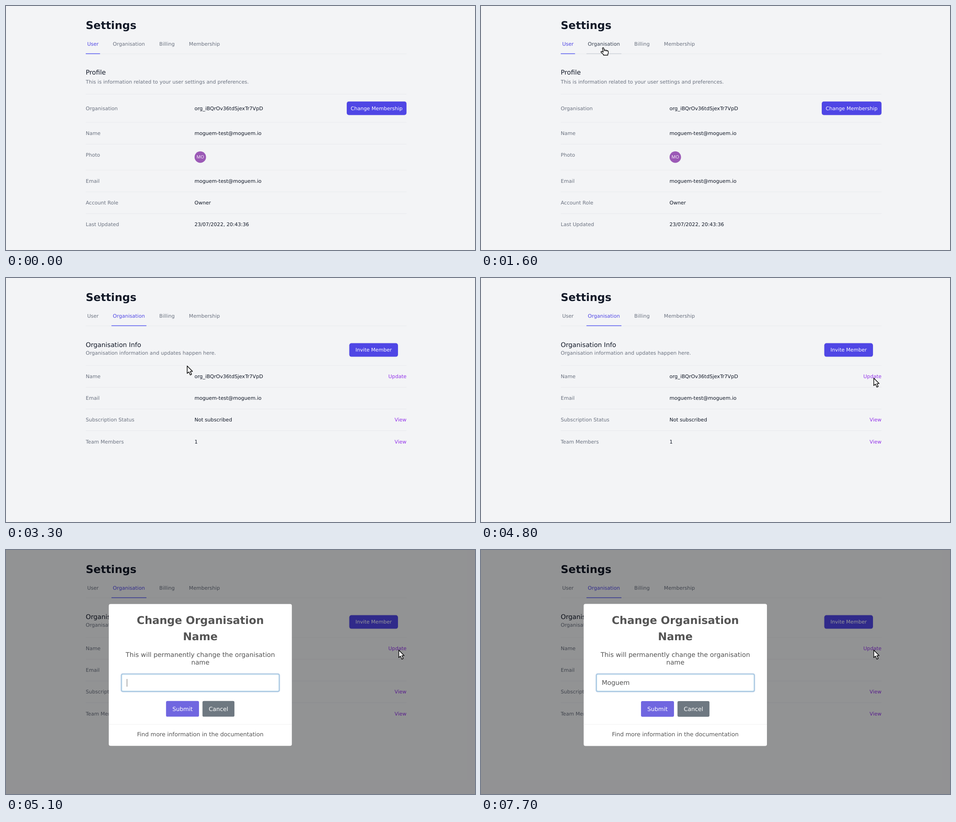
Recreate the animation shown at these times as an HTML page. Size 1035 by 541 pixels, loop 8000 ms.

```html
<!DOCTYPE html>
<html lang="en">
<head>
<meta charset="utf-8">
<title>Settings</title>
<style>
html, body { margin: 0; width: 100%; height: 100%; overflow: hidden; background: #f3f4f6; }
svg { display: block; width: 1035px; height: 541px; }
text { font-family: "DejaVu Sans", sans-serif; text-rendering: geometricPrecision; white-space: pre; }
.button { filter: drop-shadow(0 .8px .8px rgba(0, 0, 0, .08)); }
</style>
</head>
<body>
<svg id="stage" viewBox="0 0 1035 541"></svg>
<script>
const LOOP = 8000, STEP = 100;
const LEFT = 176, RIGHT = 883.8, VALUE = 416;
const SMALL = 11.06, BASE = 12.64, LARGE = 14.22, HUGE = 23.7;
const INK = '#111827', GREY = '#6b7280', LINE = '#e5e7eb', INDIGO = '#4f46e5', PURPLE = '#9333ea', MODAL = '#545454';
const ORG = 'org_iBQrOv36tdSjexTr7VpD', MAIL = 'moguem-test@moguem.io', TYPED = 'Moguem';
const stage = document.getElementById('stage');

function add(parent, tag, attrs, content) {
  const el = document.createElementNS('http://www.w3.org/2000/svg', tag);
  for (const key in attrs) el.setAttribute(key, attrs[key]);
  if (content) el.textContent = content;
  parent.appendChild(el);
  return el;
}
const group = (parent, attrs) => add(parent, 'g', attrs || {});
const rect = (parent, x, y, width, height, fill, rx = 0) =>
  add(parent, 'rect', { x, y, width, height, fill, rx });

// y is the middle of the line of text
function text(parent, content, x, y, size, fill, anchor = 'start', weight = 400) {
  return add(parent, 'text', {
    x, y: y + size * 0.346, fill, 'font-size': size, 'text-anchor': anchor, 'font-weight': weight
  }, content);
}
const show = (el, on) => el.setAttribute('visibility', on ? 'visible' : 'hidden');

function button(parent, label, x, y, width, height, fill, size, rx) {
  const g = group(parent);
  rect(g, x, y, width, height, fill, rx);
  text(g, label, x + width / 2, y + height / 2, size, '#fff', 'middle');
  return g;
}
function row(parent, y, label, value, middle = 24.5) {
  rect(parent, LEFT, y, RIGHT - LEFT, 0.8, LINE);
  text(parent, label, LEFT, y + middle, SMALL, GREY);
  if (value) text(parent, value, VALUE, y + middle, SMALL, INK);
}

// Header and tabs
text(stage, 'Settings', LEFT, 43.2, HUGE, INK, 'start', 700);
rect(stage, LEFT, 105.7, RIGHT - LEFT, 0.8, LINE);
const tabs = [['User', 176, 31.5], ['Organisation', 232.7, 77.2], ['Billing', 335.2, 40], ['Membership', 400.7, 74]]
  .map(([label, x, width]) => ({
    label: text(stage, label, x + 3.16, 84.6, SMALL, GREY),
    bar: rect(stage, x, 104.9, width, 1.6, INDIGO)
  }));

// User page
const userPage = group(stage);
text(userPage, 'Profile', LEFT, 147.5, LARGE, INK);
text(userPage, 'This is information related to your user settings and preferences.', LEFT, 168.3, SMALL, GREY);
row(userPage, 195.2, 'Organisation', ORG, 31.6);
row(userPage, 257.6, 'Name', MAIL);
row(userPage, 305.8, 'Photo');
row(userPage, 363.5, 'Email', MAIL);
row(userPage, 411.7, 'Account Role', 'Owner');
row(userPage, 459.9, 'Last Updated', '23/07/2022, 20:43:36');
button(userPage, 'Change Membership', 752, 211.7, 131.8, 30, INDIGO, SMALL, 4.7).setAttribute('class', 'button');
add(userPage, 'circle', { cx: 428.8, cy: 335, r: 12.65, fill: '#9b59b6' });
text(userPage, 'MO', 428.8, 335, 9.8, '#fff', 'middle').style.fontFamily = '"Open Sans", sans-serif';

// Organisation page
const orgPage = group(stage);
text(orgPage, 'Organisation Info', LEFT, 148.3, LARGE, INK);
text(orgPage, 'Organisation information and updates happen here.', LEFT, 166.1, SMALL, GREY);
button(orgPage, 'Invite Member', 757.6, 144.6, 107.4, 30, INDIGO, SMALL, 4.7).setAttribute('class', 'button');
const link = (label, y) => text(orgPage, label, RIGHT, y, SMALL, PURPLE, 'end');
row(orgPage, 193.6, 'Name', ORG);
row(orgPage, 241.8, 'Email', MAIL);
row(orgPage, 290, 'Subscription Status', 'Not subscribed');
row(orgPage, 338.2, 'Team Members', '1');
const update = link('Update', 218.1);
link('View', 314.5);
link('View', 362.7);

// Dialog
const MID = 428.8, CENTRE = 277;
const dialog = group(stage);
rect(dialog, 0, 0, 1035, 541, 'rgba(0,0,0,.4)');
const popup = group(dialog);
rect(popup, 226.6, 119.5, 404.4, 315, '#fff', 4);
text(popup, 'Change Organisation', MID, 156, HUGE, MODAL, 'middle', 700);
text(popup, 'Name', MID, 191.6, HUGE, MODAL, 'middle', 700);
text(popup, 'This will permanently change the organisation', MID, 232.1, LARGE, MODAL, 'middle');
text(popup, 'name', MID, 248.7, LARGE, MODAL, 'middle');
rect(popup, 253, 273.5, 351.8, 41.7, '#b1cae3', 4.5);
rect(popup, 255.3, 275.8, 347.2, 37.1, '#b4dbed', 2.7);
rect(popup, 256.1, 276.6, 345.6, 35.5, '#fff', 2);
const input = text(popup, '', 266.5, 294.5, LARGE, MODAL);
const caret = rect(popup, 266.4, 286, 0.9, 17, MODAL);
button(popup, 'Submit', 353.1, 334.9, 72.8, 34.8, '#7066e0', BASE, 3.2);
button(popup, 'Cancel', 433.6, 334.9, 70.6, 34.8, '#6e7881', BASE, 3.2);
rect(popup, 226.6, 386.1, 404.4, 0.8, '#eee');
text(popup, 'Find more information in the documentation', MID, 408.9, BASE, MODAL, 'middle');

// Pointers, each drawn with its hot spot at 0,0
const outline = { fill: '#fff', stroke: '#000', 'stroke-width': 1.4, 'stroke-linejoin': 'round' };
const arrow = add(stage, 'path', {
  ...outline, d: 'M.8 1V17.6L4.6 14.2L7.6 21L10.6 19.7L7.7 13.1H12.6Z'
});
const hand = group(stage);
add(hand, 'path', {
  ...outline,
  d: 'M-.9 2C-1.3 .2 1.5 -.2 2 1.6L3.2 6.2C4.1 5.2 5.8 5.4 6.2 6.6C7.2 5.7 8.7 6 9.1 7.2' +
     'C10.4 6.6 11.6 7.4 11.9 8.9C12.3 11 12.2 13 10.8 15V17H1.2V15.3L-3.6 11.2' +
     'C-5.2 9.8 -3.6 7.9 -2 8.8L.8 10.4Z'
});
add(hand, 'path', { d: 'M3.2 6.2L3.7 8.4M6.2 6.6L6.6 8.6M9.1 7.2L9.4 9', stroke: '#000', 'stroke-width': 1 });

// [time, x, y]
const PATH = [
  [700, 167, -6], [1100, 222, 60], [1300, 254, 90], [1500, 266, 96], [1600, 269, 92],
  [2800, 269, 92], [3000, 292, 118], [3300, 399, 194], [3500, 575, 214], [3700, 749.5, 222],
  [3800, 806, 222], [3900, 842, 221.5], [4000, 866, 221]
];
// [time, scale]
const POP = [[4805, 0.7], [4900, 1.015], [4940, 1.05], [5000, 0.964], [5045, 0.95], [5100, 0.999], [5200, 1]];
const KEYS = [5900, 6100, 6300, 6700, 6900, 7100];

function sample(table, t) {
  const next = table.findIndex(p => p[0] > t);
  if (next < 0) return table[table.length - 1].slice(1);
  if (next === 0) return table[0].slice(1);
  const a = table[next - 1], b = table[next], k = (t - a[0]) / (b[0] - a[0]);
  return a.slice(1).map((v, i) => v + (b[i + 1] - v) * k);
}

function draw(t) {
  const onOrg = t >= 2100, open = t >= 4900;
  const [x, y] = sample(PATH, t);
  const overTab = t >= 700 && x > 232 && x < 310 && y > 64 && y < 106.5;
  const overLink = onOrg && t < 4800 && x > 843 && y > 208 && y < 226;

  tabs.forEach((tab, i) => {
    const active = i === (onOrg ? 1 : 0), hover = i === 1 && overTab;
    tab.label.setAttribute('fill', active ? INDIGO : hover ? '#374151' : GREY);
    tab.bar.setAttribute('fill', active ? '#6366f1' : '#d1d5db');
    show(tab.bar, active || hover);
  });
  show(userPage, !onOrg);
  show(orgPage, onOrg);
  update.setAttribute('fill', overLink && t < 4700 ? '#a855f7' : PURPLE);

  show(dialog, open);
  const scale = sample(POP, t)[0];
  popup.setAttribute('transform', `translate(${MID} ${CENTRE}) scale(${scale}) translate(${-MID} ${-CENTRE})`);
  const count = KEYS.filter(k => t >= k).length;
  input.textContent = TYPED.slice(0, count);
  caret.setAttribute('x', 266.4 + (count ? input.getComputedTextLength() : 0));
  show(caret, open && !(t >= 5400 && t < 5900) && t < 7700);

  const place = `translate(${x} ${y})`, pointing = overTab || overLink;
  arrow.setAttribute('transform', place);
  hand.setAttribute('transform', place);
  show(arrow, t >= 700 && !pointing);
  show(hand, t >= 700 && pointing);
}

const start = performance.now();
function tick() {
  const t = (performance.now() - start) % LOOP;
  draw(Math.floor(t / STEP) * STEP);
  requestAnimationFrame(tick);
}
tick();
</script>
</body>
</html>
```
